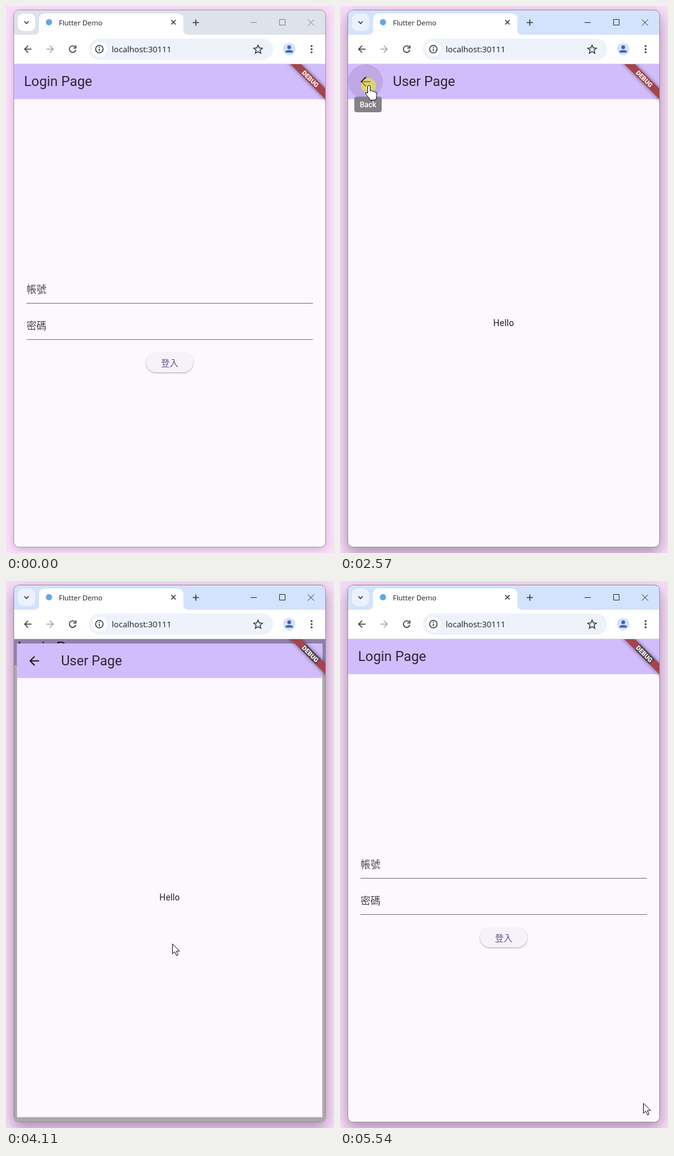
Animation of 527x875 px, one loop 5610 ms. Source, as an HTML page:

```html
<!DOCTYPE html>
<html lang="zh-Hant">
<head>
<meta charset="utf-8">
<title>Login demo</title>
<style>
  html, body { margin: 0; width: 100%; height: 100%; overflow: hidden; background: #f9defa; }
  #win { position: absolute; left: 13px; top: 7px; width: 500px; height: 858px; border-radius: 8px;
         box-shadow: 0 0 0 1px #a99bab, 0 3px 13px #6a406a55; }
  .focus #win { box-shadow: 0 0 0 1px #9d8c9f, 0 9px 22px 2px #50305070; }
  svg { position: absolute; left: 0; top: 0; }
  text { font-family: Roboto, sans-serif; fill: #1d1b20; }
  .ui { font-family: "Open Sans", "Noto Sans", sans-serif; }
  .cjk { font-family: "Noto Sans CJK TC", "Noto Sans CJK", sans-serif; fill: #49454f; }
  .title { font-size: 22px; fill: #2b2533; }
  .line { fill: none; stroke: #3c3f43; stroke-width: 1.6; }
  #strip { fill: #dee2ea; }
  .focus #strip { fill: #d3e3fd; }
  #menu { fill: #fff; }
  .focus #menu { fill: #ebf2fe; }
  #controls { fill: none; stroke: #85888d; }
  .focus #controls { stroke: #333; }
  #button rect { fill: #f7f2fa; filter: drop-shadow(0 1px 1px #0005); }
  #button.hover rect { fill: #ece4f3; filter: drop-shadow(0 1.5px 2px #0007); }
  #button text { font-size: 14px; fill: #65558f; }
  #cursor path { fill: #fff; stroke: #111; stroke-linejoin: round; }
</style>
</head>
<body>
<div id="win"></div>
<svg width="527" height="875" viewBox="0 0 527 875">
  <clipPath id="frame"><rect x="13" y="7" width="500" height="858" rx="8"/></clipPath>
  <clipPath id="view"><rect x="13" y="93" width="500" height="772"/></clipPath>

  <g clip-path="url(#frame)">
    <!-- browser chrome -->
    <rect id="strip" x="13" y="7" width="500" height="40"/>
    <rect id="menu" x="19" y="12" width="28" height="28" rx="9"/>
    <path class="line" d="M29.5 24.5l3.5 3.5 3.5-3.5" stroke-width="2"/>
    <path fill="#fff" d="M13 46H45Q53 46 53 38V22Q53 12 63 12H275Q285 12 285 22V38Q285 46 293 46H513V93H13Z"/>
    <circle cx="69" cy="26" r="5" fill="#5fa8ea"/>
    <text class="ui" x="85" y="31" font-size="11.4">Flutter Demo</text>
    <path class="line" d="M265.5 22.5l7 7m0-7l-7 7M300 26.5h10m-5-5v10"/>
    <path id="controls" d="M393 26.5h10M439.500 21.500h9v9h-9zM485 21.500l10 10m0-10l-10 10"/>
    <path class="line" d="M41 69H30m5.500-5.500L30 69l5.500 5.500"/>
    <path class="line" style="stroke:#a5a8ac" d="M65 69h11m-5.500-5.500L76 69l-5.500 5.500"/>
    <path class="line" d="M111 65.500a5.200 5.200 0 1 0 1.200 4.500M112.300 63v4.200h-4.200"/>
    <rect x="133" y="52" width="296" height="34" rx="17" fill="#edf2fb"/>
    <circle cx="150" cy="69" r="12" fill="#fff"/>
    <circle class="line" cx="150" cy="69" r="6"/>
    <path class="line" d="M150 68.300v4.200M150 65.300v1.700"/>
    <text class="ui" x="170" y="74" font-size="13.1">localhost:30111</text>
    <path class="line" style="stroke-width:1.500" d="M405 62.500l2 4.500 4.900.5-3.700 3.300 1.100 4.800-4.300-2.500-4.300 2.500 1.100-4.800-3.700-3.300 4.900-.5z"/>
    <circle cx="455" cy="69" r="10" fill="#d0e1fb"/>
    <path fill="#3f62ae" d="M449 74.500v-1q0-3 6-3t6 3v1z"/>
    <circle cx="455" cy="66" r="3" fill="#3f62ae"/>
    <g fill="#3c3f43"><circle cx="491" cy="64" r="1.600"/><circle cx="491" cy="69" r="1.600"/><circle cx="491" cy="74" r="1.600"/></g>
    <path stroke="#dfe0e6" d="M13 92.500h500"/>

    <!-- app pages -->
    <g clip-path="url(#view)">
      <g id="login">
        <rect x="13" y="93" width="500" height="772" fill="#fdf8fe"/>
        <rect x="13" y="93" width="500" height="56" fill="#d2bdfc"/>
        <text class="title" x="29" y="128">Login Page</text>
        <text class="cjk" x="33" y="459" font-size="16">帳號</text>
        <text class="cjk" x="33" y="517" font-size="16">密碼</text>
        <path stroke="#79747e" d="M33 475.500h460M33 533.500h460"/>
        <g id="button">
          <rect x="225" y="554" width="76" height="32" rx="16"/>
          <text class="cjk" x="249" y="576">登入</text>
        </g>
      </g>
      <rect id="scrim" x="13" y="93" width="500" height="772"/>
      <g id="user">
        <rect x="13" y="93" width="500" height="772" fill="#fdf8fe"/>
        <rect x="13" y="93" width="500" height="56" fill="#d2bdfc"/>
        <circle id="ripple" cx="41" cy="121" r="28" fill="#46305f"/>
        <path fill="#1d1b20" d="M49 120H36.830l5.590-5.590L41 113l-8 8 8 8 1.410-1.410L36.830 122H49z"/>
        <text class="title" x="85" y="128">User Page</text>
        <text x="263" y="512" font-size="14" letter-spacing=".25" text-anchor="middle">Hello</text>
      </g>
      <g id="tip">
        <rect x="23" y="145" width="44" height="25" rx="4" fill="#858186"/>
        <text x="45" y="162" font-size="12" font-weight="500" text-anchor="middle" style="fill:#fff">Back</text>
      </g>
      <g transform="translate(489 116.500) rotate(45)">
        <rect x="-45" y="-6" width="90" height="12" fill="#a5444c" style="filter:drop-shadow(0 0 3px #0008)"/>
        <rect id="shade" y="-6" height="12" fill="#54454f"/>
        <text y="3.700" font-size="10.200" font-weight="900" text-anchor="middle" style="fill:#fff">DEBUG</text>
      </g>
    </g>
  </g>

  <g id="cursor">
    <circle id="press" r="12" fill="#faf31e" opacity=".55"/>
    <path id="arrow" d="M.5.5V16.500L4.200 13L7 19.200L9.500 18.100L6.800 12H12Z"/>
    <path id="hand" d="M-1.500 2a2 2 0 0 1 4 0V9Q6 7.500 6.500 9.800Q9.500 8.500 10 10.800Q13 10 13 13V17Q13 20 11 23.500H2.500Q1 20-2.500 16.500L-4.800 13Q-5 10.500-3 11L-1.500 12.500Z"/>
  </g>
</svg>
<script>
const LOOP = 5610, NAV_MS = 300;
const el = id => document.getElementById(id);
const during = (t, spans) => spans.some(([a, b]) => t >= a && t < b);
const ramp = (p, a, b) => Math.min(1, Math.max(0, (p - a) / (b - a)));
const show = (id, on) => el(id).style.display = on ? '' : 'none';

// start time and direction of each page change
const navs = [[1340, true], [2600, false], [4010, true], [5130, false]];
const buttonHover = [[820, 1400], [3250, 4000]];
const backHover = [[2100, 2620], [4560, 5160]];
const handOn = [[820, 1340], [2100, 2620], [3270, 3960], [4560, 5150]];
const pressed = [[1000, 1340], [2450, 2600], [3690, 3910], [5060, 5130]];
const tipOn = [[2170, 2650], [4660, 5170]];

// pointer position: time, x, y
const path = [
  [130, 489, 840], [680, 305, 578], [900, 276, 571], [1340, 275, 571],
  [1420, 268, 566], [1900, 59, 184], [2030, 53, 140], [2170, 46, 127],
  [2650, 46, 127], [2920, 61, 159], [3130, 275, 565], [3270, 281, 595],
  [3480, 281, 595], [3690, 268, 581], [4110, 268, 581], [4450, 73, 150],
  [4730, 46, 127], [5130, 46, 127], [5540, 487, 835]
];

function pointerAt(t) {
  const i = path.findIndex(k => k[0] > t);
  if (i < 0) return path[path.length - 1].slice(1);
  if (i === 0) return path[0].slice(1);
  const [a, x, y] = path[i - 1], [b, u, v] = path[i];
  const p = (t - a) / (b - a);
  return [x + (u - x) * p, y + (v - y) * p];
}

const bezier = (a, b, c, d, s) => {
  const r = 1 - s;
  return a * r * r * r + 3 * b * s * r * r + 3 * c * s * s * r + d * s * s * s;
};

// fast start, very slow finish
function ease(p) {
  const [xs, ys] = p < 1 / 6
    ? [[0, .05, .1333, 1 / 6], [0, 0, .06, .4]]
    : [[1 / 6, .2083, .25, 1], [.4, .82, 1, 1]];
  let lo = 0, hi = 1;
  for (let i = 0; i < 20; i++) {
    const mid = (lo + hi) / 2;
    if (bezier(...xs, mid) < p) lo = mid; else hi = mid;
  }
  return bezier(...ys, lo);
}

const zoom = (id, s) =>
  el(id).setAttribute('transform', `translate(263 479) scale(${s}) translate(-263 -479)`);

function drawPages(t) {
  const [start, push] = navs.filter(n => n[0] <= t).pop() || [-NAV_MS, false];
  const p = ramp(t, start, start + NAV_MS), c = ease(p);
  zoom('login', push ? 1 + .05 * c : 1.1 - .1 * c);
  zoom('user', push ? .85 + .15 * c : 1 - .1 * c);
  el('user').style.opacity = push ? ramp(p, .125, .25) : 1 - ramp(p, .0825, .2075);
  el('scrim').style.opacity = push ? .53 * ramp(p, .2075, .4175) : 0;
}

function draw(t) {
  document.body.className = t >= 750 ? 'focus' : '';
  drawPages(t);
  const press = during(t, pressed);
  el('button').setAttribute('class', during(t, buttonHover) ? 'hover' : '');
  el('ripple').style.opacity = during(t, backHover) ? (press ? .14 : .04) : 0;
  show('tip', during(t, tipOn));

  const early = t < 3300;
  show('shade', t >= 2650);
  el('shade').setAttribute('x', early ? -4 : -16);
  el('shade').setAttribute('width', early ? 50 : 34);

  const hand = during(t, handOn);
  show('cursor', t >= 130);
  show('hand', hand);
  show('arrow', !hand);
  show('press', press);
  el('cursor').setAttribute('transform', `translate(${pointerAt(t).map(Math.round)})`);
}

const begin = performance.now();
function tick() {
  draw((performance.now() - begin) % LOOP);
  requestAnimationFrame(tick);
}
tick();
</script>
</body>
</html>
```
